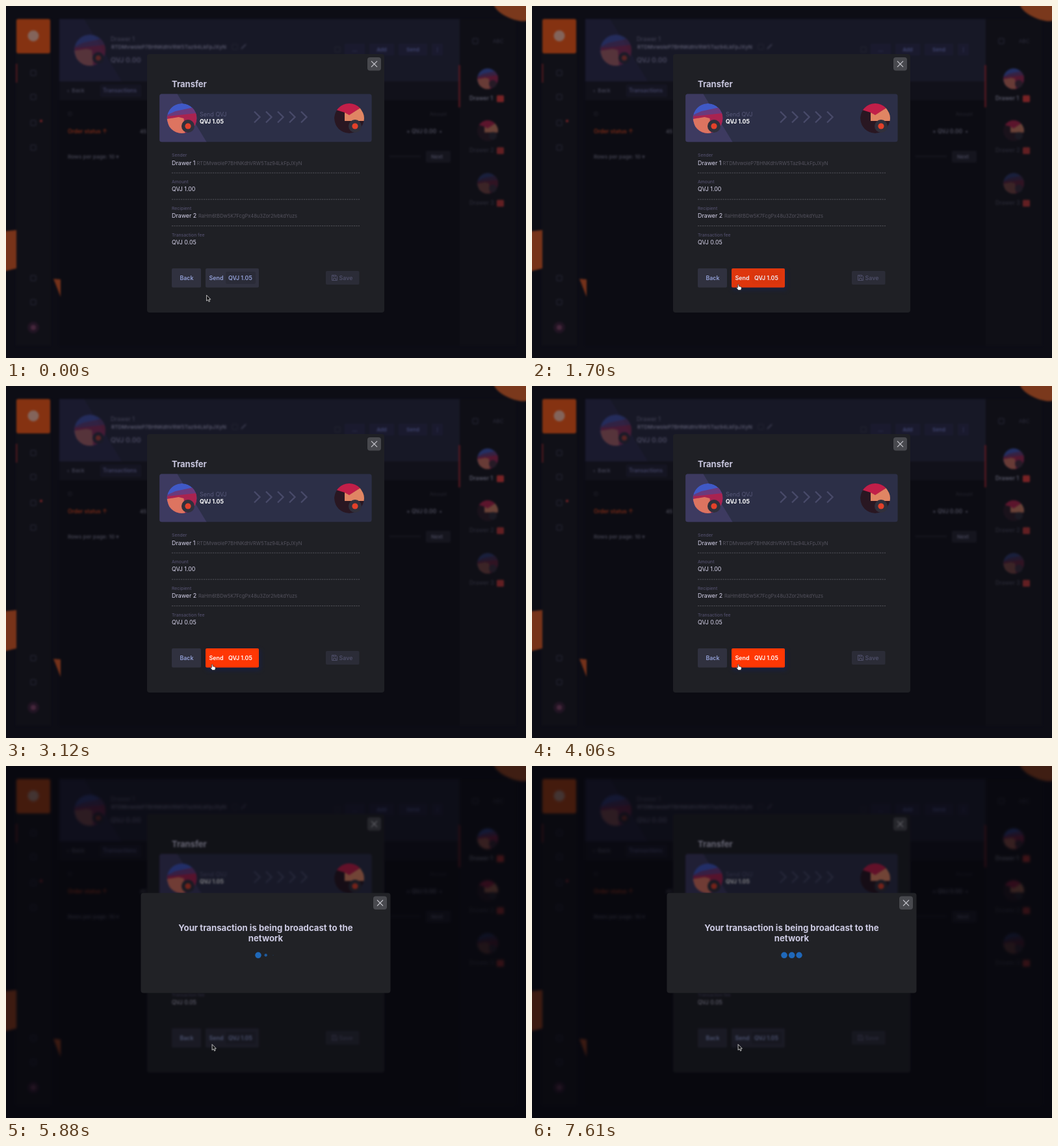
An HTML page for the animation above (7640 ms loop, 800 by 542 pixels).

```html
<!DOCTYPE html>
<html lang="en">
<head>
<meta charset="utf-8">
<title>Transfer</title>
<style>
html, body { margin: 0; height: 100%; overflow: hidden; background: #0d0d15; }
svg { display: block; width: 100vw; height: 100vh; }
text { font-family: Inter, "Open Sans", sans-serif; white-space: pre; }
#app { filter: blur(1.8px); }
#under.covered { filter: blur(1.7px); }
</style>
</head>
<body>
<svg id="stage" viewBox="0 0 800 542"></svg>
<script>
const LOOP = 7640, OPEN = 4525, MOVE_START = 1400, MOVE_END = 1700;

// Markup helpers
const rect = (x, y, w, h, fill, r = 0, more = '') =>
  `<rect x="${x}" y="${y}" width="${w}" height="${h}" rx="${r}" fill="${fill}" ${more}/>`;
const disc = (x, y, r, fill, more = '') =>
  `<circle cx="${x}" cy="${y}" r="${r}" fill="${fill}" ${more}/>`;
const path = (d, fill, more = '') => `<path d="${d}" fill="${fill}" ${more}/>`;
const line = (d, color, width, more = '') =>
  path(d, 'none', `stroke="${color}" stroke-width="${width}" ${more}`);
const text = (x, y, size, fill, str, weight = 400, more = '') =>
  `<text x="${x}" y="${y}" font-size="${size}" fill="${fill}" font-weight="${weight}" ${more}>${str}</text>`;
const avatar = (kind, x, y, r, opacity = 1) =>
  `<use href="#${kind}" transform="translate(${x} ${y}) scale(${r / 23})" opacity="${opacity}"/>`;
const badge = (x, y) => disc(x, y, 10, '#30303c') + disc(x, y, 4.6, '#e2412a');
const close = (x, y) => rect(x, y, 21, 20.5, '#48494e', 4) +
  line(`M${x + 6} ${y + 5.8}l9 9m0 -9l-9 9`, '#c9c9d0', 1.2);

const defs = `<defs>
  <clipPath id="round"><circle r="23"/></clipPath>
  <g id="first" clip-path="url(#round)">
    ${disc(0, 0, 23, '#4059c6')}
    ${path('M-23 -5L-10 -11 23 -18V2L-23 6Z', '#6a3a7c')}
    ${path('M-23 -3L23 -8V23H-10Z', '#a92350')}
    ${path('M-23 1L-5 -2 3 0 5 23H-17Z', '#dd7460')}
  </g>
  <g id="second" clip-path="url(#round)">
    ${disc(0, 0, 23, '#291722')}
    ${path('M-20 -13L-8 -24H10L17 -16 0 -4 -7 -9Z', '#c11f49')}
    ${path('M-7 -9L0 -5 17 -16 24 -4V4H-7Z', '#e08563')}
  </g>
</defs>`;

function appView() {
  const icon = (x, y) => rect(x - 4, y - 4, 8, 8, 'none', 2, 'stroke="#292a38" stroke-width="1.5"');
  let s = rect(15, 20, 54, 503, '#111117') +
    rect(82, 20, 616, 503, '#0c0c11') +
    rect(82, 20, 616, 96, '#1b1c2d') + path('M82 20H120L178 116H82Z', '#201f38') +
    rect(82, 116, 616, 29, '#13131b') +
    rect(698, 20, 87, 503, '#101016') +
    path('M751 0Q758 12 776 19T804 22V-4H751Z', '#a94a1e') +
    path('M-4 347L16 345V404L-4 409Z', '#a5431a') +
    path('M73 420L84 421V448Z', '#a0411b') +
    rect(16, 20, 52, 53, '#b9420f', 3) + disc(42, 46, 8.5, '#b58a78') +
    rect(15.5, 89, 1.6, 29, '#8d2325') + rect(696.5, 91, 2, 65, '#8d1f27') +
    disc(54, 177, 2, '#a72a2a');

  for (const y of [103, 140, 180, 218, 419, 456]) s += icon(42, y);
  s += disc(42, 495, 9, '#2a1728') + disc(42, 495, 4, '#5c304b');

  s += avatar('first', 129, 68, 24, .45) + disc(142, 80, 9, '#20202e') + disc(142, 80, 4, '#7a2c28') +
    text(161, 54, 9, '#5a5a70', 'Drawer 1') +
    text(162, 66, 8, '#77778f', 'RTDMvwoleP7BHNKdhVRW5Taz94LkFpJXyN', 600) +
    text(161, 87, 10.5, '#62627d', 'QVJ 0.00', 600) +
    icon(352, 63) + line('M362 66l7 -7', '#4a4a60', 2) + icon(510, 67);
  for (const [x, w, label] of [[521, 31, '…'], [559, 38, 'Add'], [604, 44, 'Send'], [655, 17, '⋮']])
    s += rect(x, 58, w, 18, '#1f2038', 2) +
      text(x + w / 2, 70, 8, '#555c96', label, 600, 'text-anchor="middle"');

  s += text(94, 133, 8, '#55556a', '‹  Back', 600) +
    rect(145, 121, 63, 19, '#191926', 2) + text(149, 133, 8.3, '#555783', 'Transactions', 600) +
    text(95, 169, 7, '#30303c', 'ID') + text(652, 169, 7, '#30303c', 'Amount') +
    text(95, 196, 8.5, '#ad3715', 'Order status ↑', 600) + text(206, 196, 8, '#62626f', '45', 600) +
    text(616, 196, 8.6, '#666678', '+ QVJ 0.00  •', 600) +
    text(95, 235, 8.2, '#555565', 'Rows per page: 10 ▾', 600) +
    rect(590, 230, 48, 3, '#15151c') + rect(646, 223, 38, 18, '#181821', 2) +
    text(654, 235, 8, '#5c5c73', 'Next', 600);

  s += icon(722, 54) + text(749, 57, 8, '#3a3a4c', 'ABC');
  [['first', 112, .62, '#77778a'], ['second', 192, .62, '#30303c'], ['first', 273, .3, '#30303c']]
    .forEach(([kind, y, o, color], i) => {
      s += avatar(kind, 741, y, 16, o) + disc(749, y + 8, 6, '#20202a', 'opacity=".8"') +
        text(713, y + 33, 8.6, color, 'Drawer ' + (i + 1), 600) +
        rect(755, y + 25.5, 11, 10.5, i ? '#862626' : '#a52b2a', 1.5);
    });

  // Dimming veil behind the transfer window
  return s + rect(-10, -10, 820, 562, '#10101a', 0, 'opacity=".3"');
}

function transferView() {
  const label = '#514e6b', value = '#d7d4ec', faint = '#55535f';
  let s = rect(217, 74, 365, 398, '#1f2025', 4) + close(556, 79) +
    text(255, 124.6, 13, '#c9c7df', 'Transfer', 700) +
    rect(236.2, 135.5, 326.4, 73.8, '#2c2f47', 3.5) +
    path('M239.7 135.5H263.5L308.5 209.3H239.7Q236.2 209.3 236.2 205.8V139Q236.2 135.5 239.7 135.5Z', '#3d3a60') +
    avatar('first', 270.5, 173, 23) + badge(280, 185) +
    avatar('second', 528, 173, 23) + badge(537, 185) +
    text(298, 170, 9, '#565778', 'Send QVJ') +
    text(298, 180.5, 8.7, '#fff', 'QVJ 1.05', 700);
  for (let i = 0; i < 5; i++) s += line(`M${382 + 18 * i} 162.5l8.5 8.5 -8.5 8.5`, '#484a69', 2.4);

  const rows = [
    ['Sender', 'Drawer 1', 'RTDMvwoleP7BHNKdhVRW5Taz94LkFpJXyN'],
    ['Amount', 'QVJ 1.00'],
    ['Recipient', 'Drawer 2', 'RaHm6tBDw5K7FcgPx48u3Zor2lvbkdYuzs'],
    ['Transaction fee', 'QVJ 0.05']
  ];
  rows.forEach(([name, main, address], i) => {
    const y = 232.3 + 40.8 * i;
    s += text(255, y, 6.8, label, name, 500) + text(255, y + 12.3, 8.9, value, main);
    if (address) s += text(i ? 296 : 293.5, y + 12.3, 7.5, faint, address);
    if (i < 3) s += line(`M255 ${y + 24.7}H544`, '#53535b', 1, 'stroke-dasharray="2.2 1.3"');
  });

  const blue = '#929fd6';
  return s + rect(255, 404, 45, 29.5, '#30313f', 2) + text(267.5, 421.7, 8.8, blue, 'Back', 600) +
    rect(308, 406, 84, 32, '#14204a', 3, 'id="glow" style="filter:blur(3px)"') +
    rect(307, 404, 82, 29.5, '#30313f', 2, 'id="send"') +
    rect(338, 409, 46, 19, '#000', 2, 'id="chip"') +
    `<g id="sendText">${text(312.5, 421.7, 8.9, 'inherit', 'Send', 600)}${text(342, 421.7, 8.8, 'inherit', 'QVJ 1.05', 600)}</g>` +
    rect(492, 408, 51.5, 21, '#2b2c37', 2) + text(512.5, 421.7, 8.8, '#4e4e68', 'Save', 600) +
    line('M501.5 414.5h6l2 2v6h-8zM503.5 414.5v2.5h3.5v-2.5M503.5 422.5v-3h4v3', '#4e4e68', 1);
}

function broadcastView() {
  const title = (y, str) => text(399.5, y, 13.2, '#cdcbe3', str, 700, 'text-anchor="middle"');
  return rect(0, 0, 800, 542, '#05050b', 0, 'opacity=".5"') +
    rect(207.5, 195.5, 384, 154, '#212226', 4) + close(565, 200.5) +
    title(253.6, 'Your transaction is being broadcast to the') + title(269.7, 'network') +
    [388, 399.7, 411].map(x => disc(x, 291.3, 4.8, '#1f68b9', 'class="dot"')).join('');
}

const $ = id => document.getElementById(id);
$('stage').innerHTML = defs + rect(0, 0, 800, 542, '#0d0d15') +
  `<g id="under"><g id="app">${appView()}</g><g>${transferView()}</g></g>
  <g id="dialog">${broadcastView()}</g>
  <g id="cursor" stroke-linejoin="round">
    ${path('M0 0V9.6L2.2 7.6 3.8 11 5.4 10.3 3.9 7.1H6.8Z', '#08080b', 'id="arrow" stroke="#e4e4e4" stroke-width=".9"')}
    ${path('M-.8 .4Q.3 -.6 1.1 .6V3.4Q2.2 2.8 2.8 3.8 4 3.3 4.5 4.4 5.5 4.2 5.6 5.4V7.2L4.6 9.6H.2L-2.8 6Q-3 4.8 -1.7 5L-.8 5.8Z', '#fff', 'id="hand" stroke="#111" stroke-width=".7"')}
  </g>`;
const dots = [...document.querySelectorAll('.dot')];

const clamp = v => Math.max(0, Math.min(1, v));
const mix = (a, b, k) => `rgb(${a.map((v, i) => Math.round(v + (b[i] - v) * k))})`;

// cubic-bezier(.2, .68, .18, 1.08)
function pulseEase(x) {
  const curve = (a, b, s) => 3 * (1 - s) ** 2 * s * a + 3 * (1 - s) * s * s * b + s ** 3;
  let lo = 0, hi = 1;
  for (let i = 0; i < 20; i++) {
    const mid = (lo + hi) / 2;
    if (curve(.2, .18, mid) < x) lo = mid; else hi = mid;
  }
  return curve(.68, 1.08, lo);
}

// 1 is full size, 0 is the smallest point of the pulse
function pulse(ms) {
  if (ms < 0) return 1;
  const p = ms % 750 / 750;
  if (p < .45) return 1 - pulseEase(p / .45);
  return p < .8 ? pulseEase((p - .45) / .35) : 1;
}

function draw(now) {
  const t = Math.max(0, now) % LOOP, open = t >= OPEN;
  const k = clamp((t - MOVE_START) / (MOVE_END - MOVE_START)), move = k * k * (3 - 2 * k);
  const x = 308.6 + 8.5 * move, y = 445.2 - 16.6 * move;
  const over = y < 433.5;
  const hover = clamp((t - 1600) / 120) * (1 - clamp((t - 4570) / 180));

  $('send').setAttribute('fill', mix([48, 49, 63], [255, 55, 4], hover));
  $('sendText').setAttribute('fill', mix([146, 159, 214], [255, 255, 255], hover));
  $('chip').setAttribute('opacity', .12 * (1 - hover));
  $('glow').setAttribute('opacity', .7 * hover);
  $('under').classList.toggle('covered', open);
  $('dialog').style.display = open ? '' : 'none';
  $('cursor').setAttribute('transform', `translate(${x} ${y}) scale(.92)`);
  $('arrow').style.display = over && !open ? 'none' : '';
  $('hand').style.display = over && !open ? '' : 'none';

  dots.forEach((dot, i) => {
    const size = pulse(t - OPEN - 120 * (i + 1));
    dot.setAttribute('r', 4.8 * (.1 + .9 * size));
    dot.setAttribute('opacity', Math.min(1, .7 + .3 * size));
  });
}

function tick() {
  draw(performance.now());
  requestAnimationFrame(tick);
}
tick();
</script>
</body>
</html>
```
